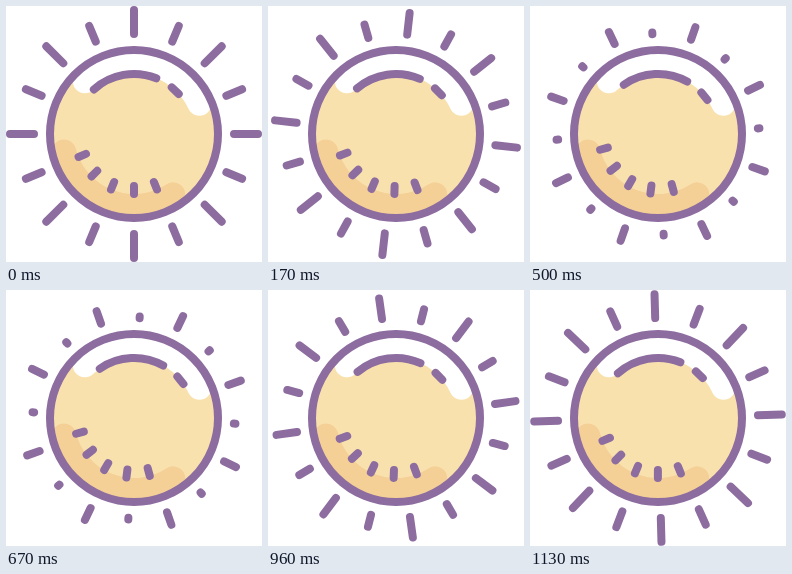
These frames come from a looping animation (256x256 px, 1.18 s). An HTML page:

```html
<!DOCTYPE html>
<html lang="en">
<head>
<meta charset="utf-8">
<title>Sun</title>
<style>
  html, body { margin: 0; width: 100%; height: 100%; overflow: hidden; background: #fff; }
  svg { display: block; width: 100%; height: 100%; }
  .line { fill: none; stroke: #8d6c9f; stroke-width: 8; stroke-linecap: round; }
  .band { fill: none; stroke-width: 24; stroke-linecap: round; }
</style>
</head>
<body>
<svg viewBox="-128 -128 256 256">
  <circle r="84" fill="#f9e1ae"/>
  <path id="shine" class="band" stroke="#fff"/>
  <path id="shade" class="band" stroke="#f4d097"/>
  <path id="details" class="line"/>
  <circle class="line" r="84"/>
  <path id="rays" class="line"/>
</svg>
<script>
  const FPS = 24, FRAMES = 28, LOOP = 1180;
  const $ = id => document.getElementById(id);

  // Polar point: degrees clockwise from the top.
  const point = (r, deg) => {
    const a = deg * Math.PI / 180;
    return (r * Math.sin(a)).toFixed(3) + ' ' + (-r * Math.cos(a)).toFixed(3);
  };
  const arc = (r, from, to) => `M${point(r, from)}A${r} ${r} 0 0 1 ${point(r, to)}`;
  const spoke = (deg, inner, outer) => `M${point(inner, deg)}L${point(outer, deg)}`;
  const ease = x => x * x * (3 - 2 * x);

  $('shine').setAttribute('d', arc(72, -43, 65.2));
  $('shade').setAttribute('d', arc(72, 147, 256));

  let details = arc(60, -42, 21.8) + spoke(0, 0, 0).slice(0, 0);
  details += `M${point(60, 39)}L${point(60, 48.2)}`;
  for (let i = -1; i < 4; i++) details += spoke(180 + i * 22.5, 52, 60);
  $('details').setAttribute('d', details);

  function draw(frame) {
    const half = FRAMES / 2;
    const shrink = ease(1 - Math.abs(frame - half) / half);
    const turn = 45 * frame / FRAMES;
    const long = 124 - 11.5 * shrink;
    const short = 117 - 16.3 * shrink;
    let rays = '';
    for (let i = 0; i < 16; i++) rays += spoke(turn + i * 22.5, 100, i % 2 ? short : long);
    $('rays').setAttribute('d', rays);
    $('details').setAttribute('transform', `rotate(${7.7 * shrink})`);
  }

  // Frames start on the nearest 10 ms; the last one holds until the loop ends.
  function frameAt(ms) {
    const t = Math.floor(ms % LOOP / 10) * 10 + 4.9;
    return Math.min(FRAMES - 1, Math.floor(t * FPS / 1000));
  }

  const start = performance.now();
  function tick() {
    draw(frameAt(performance.now() - start));
    requestAnimationFrame(tick);
  }
  tick();
</script>
</body>
</html>
```
